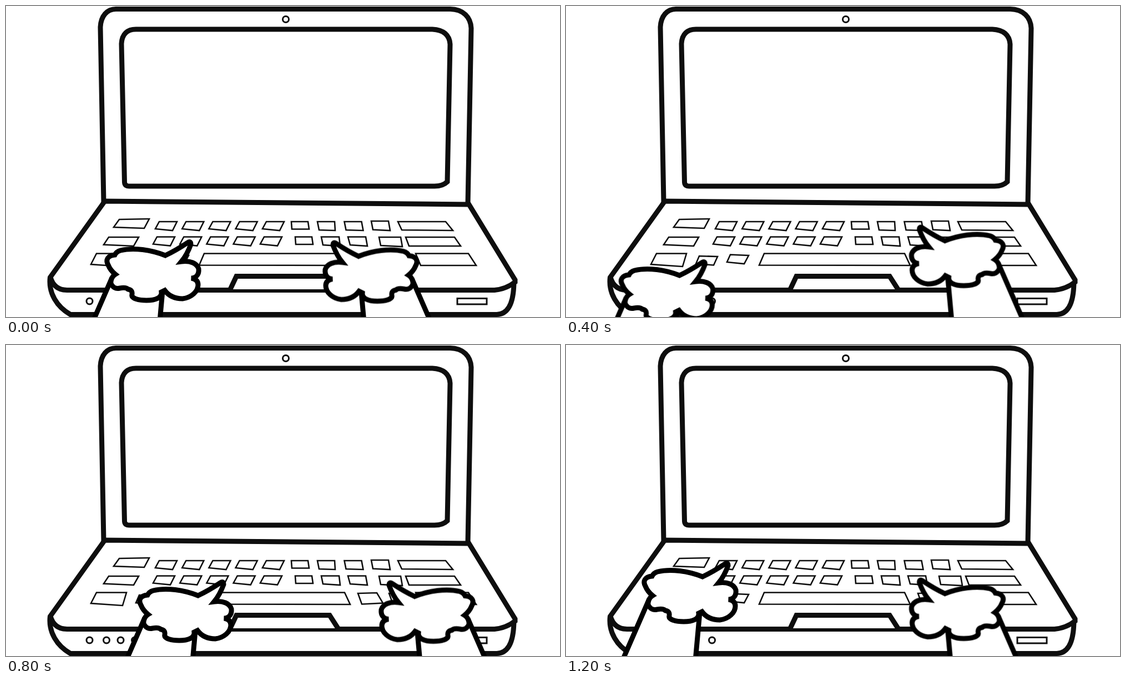
Recreate the animation shown at these times as an HTML page. Size 998 by 561 pixels, loop 1400 ms.

```html
<!DOCTYPE html>
<html lang="en">
<head>
<meta charset="utf-8">
<title>Typing hands</title>
<style>
  html, body { margin: 0; width: 100%; height: 100%; overflow: hidden; background: #fff; }
  svg { display: block; width: 998px; height: 561px; }
  path, circle, rect { fill: #fff; }
  .body { stroke: #0e0e0e; stroke-width: 9; }
  .keys { stroke: #0e0e0e; stroke-width: 2.6; }
  .small { stroke: #0e0e0e; stroke-width: 3; }
  .hand { stroke: #000; stroke-width: 9; }
  .left { animation: left 1400ms step-end infinite; }
  .right { animation: right 1400ms step-end infinite; }
  @keyframes left {
    0%, 100% { transform: translate(0, 0); }
    14.2857% { transform: translate(92px, 7px); }
    28.5714% { transform: translate(-82.5px, 36px); }
    42.8571% { transform: translate(-46px, -32px); }
    57.1428% { transform: translate(59px, 2px); }
    71.4285% { transform: translate(82.5px, 36px); }
    85.7142% { transform: translate(-41px, -32px); }
  }
  @keyframes right {
    0%, 100% { transform: translate(0, 0); }
    14.2857% { transform: translate(-105px, -30px); }
    28.5714% { transform: translate(47.5px, -28px); }
    42.8571% { transform: translate(-43.5px, 0); }
    57.1428% { transform: translate(101px, 2px); }
    71.4285% { transform: translate(151px, -38px); }
    85.7142% { transform: translate(47.5px, -3px); }
  }
</style>
</head>
<body>
<svg viewBox="0 0 998 561">
  <defs>
    <path id="key" d="M0 0h32l-8 16-31-3z"/>
    <g id="hand" class="hand">
      <path d="M191 490L137.500 613H273L282 514"/>
      <path d="M287 450C262 440 230 435 206 441Q199 443 196 449C183 450 179 458 184 467Q188 477 197 484
        C189 489 187 500 191 504Q196 511 205 509Q216 507 220 511Q228 512 227 520C225 528 240 531 253 531
        C270 531 281 526 280 516L286 513C294 524 305 528 318 528C334 526 346 515 346 503Q346 493 334 491
        C344 490 348 483 347 474C344 464 332 459 316 461Q326 449 333 430Q333 423 327 427Q306 441 287 450Z"/>
    </g>
  </defs>

  <g class="body">
    <path d="M176 354L170 38C171 18 182 5.500 198 5.500H800C824 6 837 20 838 40L832 357"/>
    <path d="M208 68C209 50 219 42 234 42H768C788 43 799 52 800 69L795 317C789 323 782 325 772 325H222Q214 325 213.500 318Z"/>
    <path d="M79.500 489C76 518 92 543 116 556.500H884C905 556 915 535 915 496"/>
    <path d="M178 352L80 489C84 504 94 512.500 110 512.500H880C896 511 908 505 917 498V494L834 358Z"/>
    <path d="M404 511L415 487.500H583L598 511"/>
  </g>

  <g class="keys">
    <path d="M204 385l54-1-9 17-55-2z"/>
    <use href="#key" x="276" y="389"/>
    <use href="#key" x="324.300" y="389"/>
    <use href="#key" x="372.500" y="389"/>
    <use href="#key" x="420.700" y="389"/>
    <use href="#key" x="469" y="389"/>
    <path d="M514 389h30l2 13.500h-31z"/>
    <path d="M561 389h31l1 16-29-1z"/>
    <path d="M609.500 389h31l3 16-31-1z"/>
    <path d="M658 388h31l3 17-31-1.500z"/>
    <path d="M706 389h86l13 16-92-1z"/>

    <path d="M185 417h54l-9 16-54-2.500z"/>
    <use href="#key" x="272" y="416.500"/>
    <use href="#key" x="320.300" y="416.500"/>
    <use href="#key" x="368.500" y="416.500"/>
    <use href="#key" x="416.700" y="416.500"/>
    <use href="#key" x="465" y="416.500"/>
    <path d="M521 416.500h30l2 13.500h-31z"/>
    <path d="M568 416.500h32l2 16.500-31-2z"/>
    <path d="M616 416.500h32l3 16.500-31-2z"/>
    <path d="M672 417h39l3 17-39-2z"/>
    <path d="M720 417h88l11 16h-93z"/>

    <path d="M163 446.500h54l-7 23.500-57-4z"/>
    <path d="M240 451l33 1-7 15.500-32-2.500z"/>
    <path d="M296 448.500l33 1.500-8 15-31-3z"/>
    <path d="M357 446.500h253l10 21.500-272-.5z"/>
    <path d="M634 448l34-1 11 18.500-38 2z"/>
    <path d="M690 448l34-1.500 11 18.500-38 2z"/>
    <path d="M738 446.500h95l14 21.500h-100z"/>
  </g>

  <g class="small">
    <circle cx="504" cy="24" r="5.500"/>
    <circle cx="150.500" cy="532.500" r="5.500"/>
    <circle cx="181" cy="532.500" r="5.500"/>
    <circle cx="206.500" cy="532.500" r="5.500"/>
    <circle cx="232" cy="532.500" r="5.500"/>
    <circle cx="263" cy="532.500" r="5.500"/>
    <rect x="813" y="527.500" width="53" height="10.500"/>
  </g>

  <g class="left"><use href="#hand"/></g>
  <g class="right"><use href="#hand" transform="matrix(-1 0 0 1 922 1.500)"/></g>
</svg>
</body>
</html>
```
